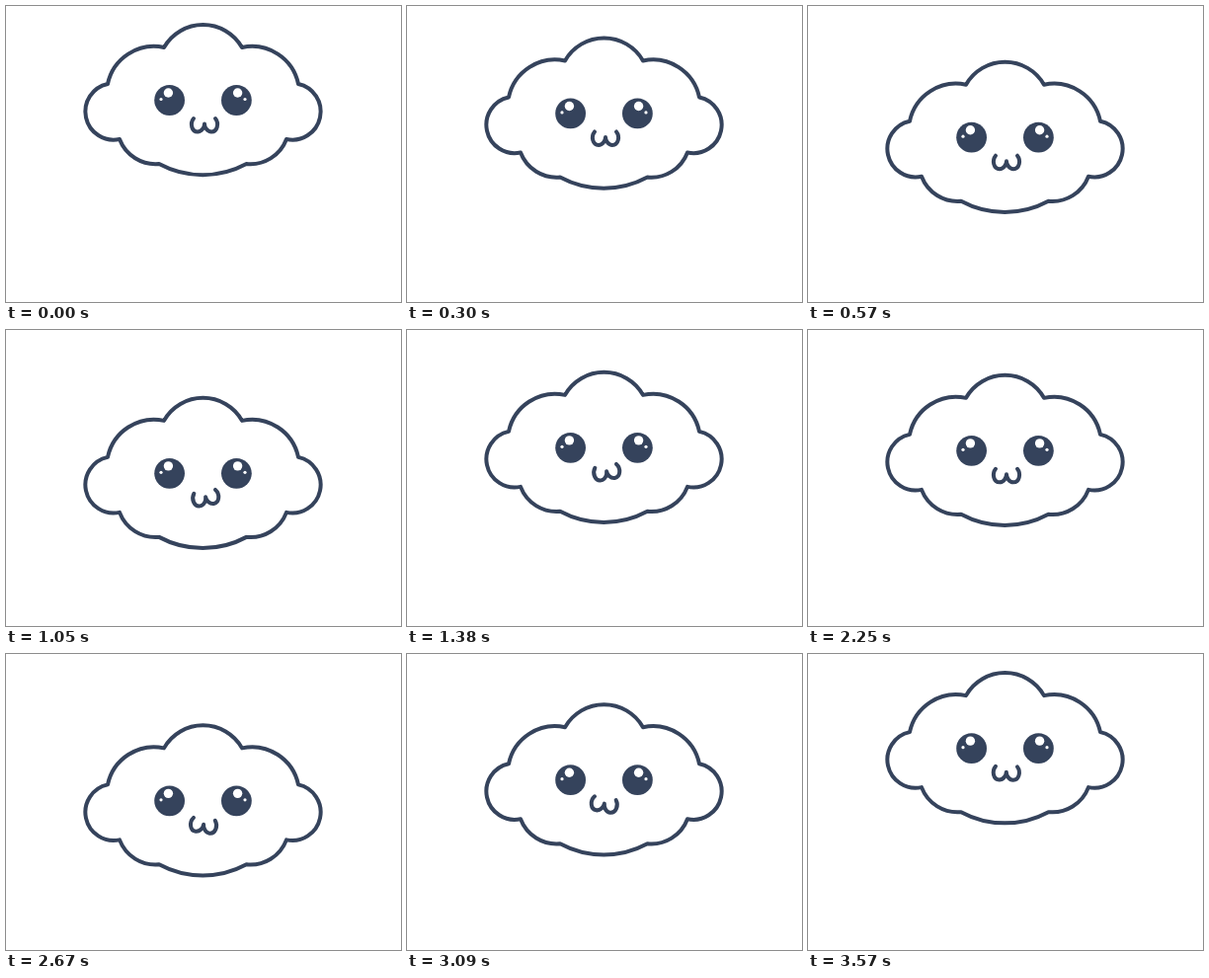
Recreate the animation shown at these times as an HTML page. Size 400 by 300 pixels, loop 3.6 s.

```html
<!DOCTYPE html>
<html lang="en">
<head>
<meta charset="utf-8">
<title>Floating cloud</title>
<style>
  html, body { margin: 0; height: 100%; overflow: hidden; background: #fff; }
  svg { display: block; width: 400px; height: 300px; }
  .line { fill: none; stroke: #35435c; stroke-width: 4; stroke-linecap: round; stroke-linejoin: round; }
  .eye { fill: #35435c; }
  .shine { fill: #fff; }
</style>
</head>
<body>
<svg viewBox="0 0 400 300">
  <g id="cloud">
    <path class="line" d="M160 42A45.4 45.4 0 0 1 239 42A48 48 0 0 1 296 79
      A28.5 28.5 0 0 1 284 135A39 39 0 0 1 243.5 160A93 93 0 0 1 155 160
      A39 39 0 0 1 115 135A28.5 28.5 0 0 1 103 79A48 48 0 0 1 160 42Z"/>
    <g id="eye">
      <circle class="eye" cx="165.6" cy="95.5" r="15.4"/>
      <circle class="shine" cx="164.4" cy="88" r="4.7"/>
      <circle class="shine" cx="157" cy="94.5" r="1.6"/>
    </g>
    <use href="#eye" transform="matrix(-1 0 0 1 399 0)"/>
    <path id="mouth" class="line" d="M190 114C186 119 188 127.5 194 127.5
      C198 127.5 201 123 201 119.5C201 123 204 127.5 208 127.5C214 127.5 216 119 212 114"/>
  </g>
</svg>
<script>
const LOOP = 3600, BOB = 1800, DROP = 53.5, TILT = 10;
const cloud = document.getElementById('cloud');
const mouth = document.getElementById('mouth');
const ramp = (t, from, to) => Math.min(1, Math.max(0, (t - from) / (to - from)));

function draw(now) {
  const t = now % LOOP, u = t % BOB;
  const y = DROP * (1 - Math.cos(2 * Math.PI * u / BOB)) / 2;
  // The mouth tilts one way on the first bob and the other way on the second.
  const side = t < BOB ? -1 : 1;
  const angle = side * TILT * (ramp(u, 600, 950) - ramp(u, 1580, 1800));
  cloud.setAttribute('transform', `translate(0 ${y})`);
  mouth.setAttribute('transform', `rotate(${angle} 201 113)`);
}

const start = performance.now();
function tick() {
  draw(performance.now() - start);
  requestAnimationFrame(tick);
}
tick();
</script>
</body>
</html>
```
